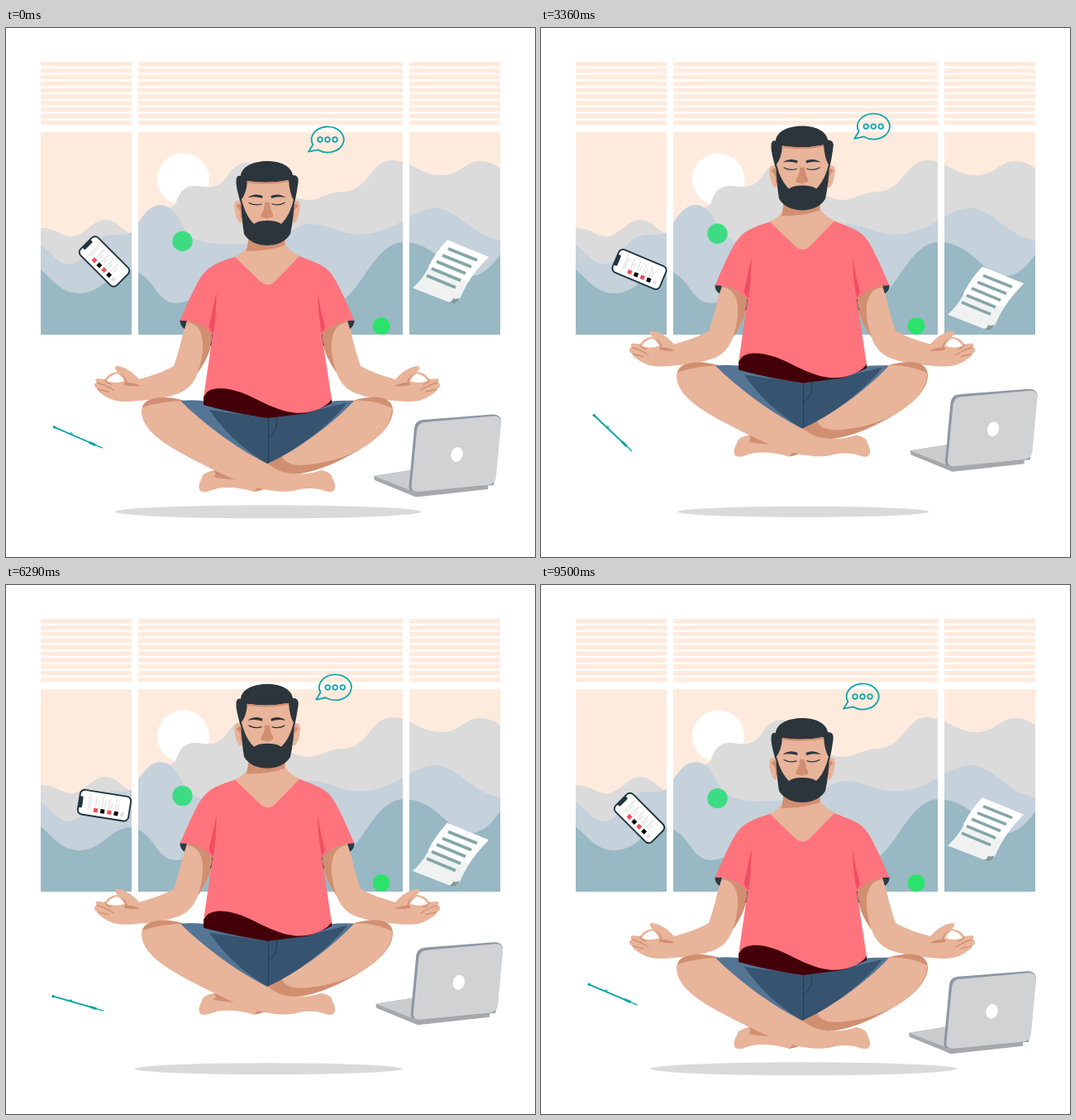
Write an HTML page that moves like this. It is 640 px wide and 640 px high and loops after 9570 ms.

```html
<!DOCTYPE html>
<html lang="en">
<head>
<meta charset="utf-8">
<title>Floating meditation</title>
<style>
  html, body { margin: 0; width: 100%; height: 100%; overflow: hidden; background: #fff; }
  svg { display: block; width: 100vw; height: 100vh; }
  .skin { fill: #e8b49a; }
  .shade { fill: #d18f71; }
  .hair { fill: #2c353c; }
  .line { fill: none; stroke-linecap: round; }
</style>
</head>
<body>
<svg viewBox="0 0 640 640">
  <defs>
    <clipPath id="panes"><path d="M42 126H152V371H42ZM160 126H480V371H160ZM488 126H598V371H488Z"/></clipPath>

    <g id="arm">
      <path class="skin" fill-rule="evenodd" d="M217 354C214 374 208 394 203 409C190 416 176 421 161 425
        C157 420 152 416 148 414Q140 409 133 409Q130 412 135 416Q124 417 120 425L110 424Q107 426 110 429
        Q106 430 107 433Q107 435 111 437Q111 440 115 442Q122 448 133 451Q145 453 160 451Q190 449 209 442
        Q226 435 232 417C243 402 250 385 250 366L235 350Z
        M122 427Q126 420 135 418Q140 421 143 427Q133 431 122 427Z"/>
      <path class="shade" d="M218 356C240 357 243 385 232 417C243 402 250 385 251 365L236 350Z
        M139 418Q145 422 147 429Q155 429 162 433Q151 434 144 432Q141 431 145 428Q143 422 139 418Z"/>
      <path class="line" stroke="#d18f71" stroke-width="1.3" d="M110 429Q121 432 130 438M111 437L124 440M120 425Q120 429 127 431"/>
      <path fill="#2c3a44" d="M210.500 353Q210 360 216 364L219 354ZM246 366L252 369V383L247 384Q250 375 249 369Z"/>
    </g>

    <g id="ear">
      <path class="skin" d="M286 210Q277 206 276 214Q277 229 282 235Q285 237 288 233Z"/>
      <path class="shade" d="M285 213Q279 211 279 217Q284 217 284 231Q289 225 285 213Z"/>
    </g>
  </defs>

  <g id="blinds" fill="#ffebdd"></g>
  <g clip-path="url(#panes)">
    <path fill="#ffebdd" d="M42 126H598V371H42Z"/>
    <circle cx="214.500" cy="183" r="31.500" fill="#fff"/>
    <path fill="#dbdbdb" d="M42 242C60 241 68 254 82 252C98 248 104 233 120 232C134 232 141 246 152 249L205 213
      C209 199 217 189 232 191C252 195 261 190 269 177C276 167 284 163 291 163C318 166 325 205 365 208
      C382 208 385 199 408 198C440 196 441 160 467 160C490 160 500 178 527 178C550 178 555 161 573 161
      C584 161 592 165 598 170V371H42Z"/>
    <path fill="#c5d1db" d="M42 263C55 270 62 287 77 286C98 284 101 254 122 251C134 248 141 253 152 247
      C162 234 171 214 187 214C210 215 210 247 230 256C262 268 320 260 345 246C366 230 385 240 405 246
      C435 256 465 243 482 232C500 222 508 218 519 218C548 219 562 251 598 257V371H42Z"/>
    <path fill="#98b8c4" d="M42 292C55 303 67 321 88 321C118 321 124 294 152 293C180 299 181 333 206 333
      C235 331 245 308 275 308C320 308 360 345 392 338C430 328 443 259 482 259C522 260 535 300 563 300
      C580 299 590 284 598 274V371H42Z"/>
    <circle cx="454" cy="360.500" r="10.500" fill="#2be36a"/>
  </g>

  <circle id="badge" cx="213.500" r="12.200" fill="#3ddc84"/>

  <g id="bubble" class="line" stroke="#11a5a9" stroke-width="1.800" stroke-linejoin="round">
    <path d="M371.300 141.200L366 149.700L377.500 147.400A19.500 15.500 0 1 0 371.300 141.200Z"/>
    <circle cx="380" cy="135" r="2.800"/><circle cx="389" cy="135" r="2.800"/><circle cx="398" cy="135" r="2.800"/>
  </g>

  <g id="phone">
    <rect x="-31" y="-15" width="62" height="30" rx="5.500" fill="#fff" stroke="#20343f" stroke-width="1.900"/>
    <path fill="#20343f" d="M-31 -7H-28Q-26.500 -7 -26.500 -5V5Q-26.500 7 -28 7H-31Z"/>
    <path class="line" stroke="#dedede" stroke-width="1.300" stroke-dasharray="2 1.500" d="M-19 -11V9M-16.500 -7V6M-10 -9V3M-2 -10V3M6 -8V3M14 -9V3M-7 -4V3M1 -4V3M9 -4V3M17 -4V3"/>
    <path fill="#f34e5c" d="M-12 5h5v5h-5zM4.600 5h5v5h-5z"/>
    <path d="M-3.700 5h5v5h-5zM12.900 5h5v5h-5z"/>
    <path fill="#e0e0e0" d="M21 5h4v5h-4z"/>
  </g>

  <g id="paper">
    <path fill="#f0f2f2" d="M534 256.500L584 277Q567 294 559 308Q552 320 549 328L537 332L492 314.500Q505 303 512 288Q520 271 534 256.500Z"/>
    <path fill="#fff" d="M534 256.500L584 277Q569 292 560 306L511 289Q520 271 534 256.500Z"/>
    <path fill="#829b99" d="M536 332Q540 331 541 327Q545 329 549 326Q547 330 543 333Z"/>
    <path stroke="#84a7a6" stroke-width="3.600" d="M535 267L570 281M528 275L563 289M521 282.500L556 297M515 291L550 305.500M509 299.500L544 314"/>
  </g>

  <g id="pen" stroke="#0aa5a5" fill="none">
    <path stroke-width="1.900" d="M-31 0H17"/>
    <path stroke-width="3" d="M-32 0H-29M16 0H24"/>
    <path stroke-width="1.300" d="M23 0H33M-10 -1.500H-7"/>
  </g>

  <g id="laptop">
    <path fill="#a7a8ac" d="M445 542L489 535L492 559L583 552V558L496 567.500L446 547Z"/>
    <path fill="#cbccce" d="M445 542L489 535L490 561L496 562Z"/>
    <path fill="#8d97a4" d="M487.500 554L494 484Q495 475 504 474L588 467.500Q598 467 599 475L590 553L494 561Q487 561 487.500 554Z"/>
    <path fill="#d1d2d4" d="M490.500 554L497 487Q498 478 506 477L590 469.500Q599 469 599 477L593 543Q592 552 583 553L498 561Q490 561 490.500 554Z"/>
    <ellipse cx="545.500" cy="516" rx="7" ry="9" transform="rotate(15 545.500 516)" fill="#fff"/>
  </g>

  <ellipse id="shadow" rx="185.500" ry="8" fill="#dadada"/>

  <g id="man">
    <use href="#arm"/><use href="#arm" transform="matrix(-1 0 0 1 632 0)"/>

    <path class="skin" d="M252 535Q237 538 237 545Q231 554 235 560Q240 563 249 559C264 554 282 556 300 561L318 554L300 535Z"/>
    <path class="shade" d="M251 535L320 554Q310 560 299 561Q308 556 300 551C288 545 268 547 251 543Q256 540 251 535Z"/>
    <path class="shade" d="M422 450C448 443 468 446 468 463C467 490 427 512 400 525C380 534 360 540 343 540L312 528Z"/>
    <path class="skin" d="M412 451C440 449 455 455 467 460C468 491 420 526 356 529Q336 528 334 517L340 505L385 465Z"/>
    <path class="skin" d="M212 450C188 443 164 446 164 464C165 492 206 512 250 534C275 546 300 558 325 560
      C340 562 349 560 356 558C368 556 378 557 386 560Q394 563 397 559Q400 554 395 545Q395 538 382 535
      Q362 541 345 539Q330 535 316 527L260 465Z"/>
    <path class="shade" d="M165 459C170 446 190 444 216 451Q190 451 165 459ZM316 526Q332 530 343 539Q328 537 316 526Z"/>

    <path fill="#547594" d="M211 451Q230 449 245 452H390Q405 450 421 451C392 482 350 512 316 527C285 512 242 482 211 451Z"/>
    <path fill="#36536f" d="M246 462L317 472L365 465L413 453C390 482 350 512 316 527C285 508 263 487 246 462Z"/>
    <path class="line" stroke="#1f3c59" d="M317.500 471V526M328 470Q329 489 318 495"/>

    <path class="skin" d="M293 250H338V262Q344 271 356 276L350 320H285L276 277Q290 271 293 262Z"/>
    <path class="shade" d="M294 252H338L337 263Q318 270 291 270Z"/>
    <path fill="#430008" d="M239 446L250 430H380L394 449V454Q375 463 364 466L317 472Q275 466 239 456Z"/>
    <path fill="#ff737d" d="M277 277C258 283 246 287 236 301C227 315 218 337 210.500 354C228 353 241 360 250 371L239 447
      C243 434 262 433 285 441C310 451 336 470 365 465Q387 460 394 449L382 371C391 360 404 353 421.500 354
      C414 337 405 315 396 301C388 287 374 284 355 276L327 305Q317 316 306 305Z"/>
    <path fill="#f04e61" d="M254.500 320Q249 345 245.500 362L251 370Q255 345 254.500 320ZM377.500 320Q377 345 382 369L386 362Q380 340 377.500 320Z"/>

    <use href="#ear"/><use href="#ear" transform="matrix(-1 0 0 1 632 0)"/>
    <path class="hair" d="M284 179C285 167 300 161 316 161C332 161 345 167 347 178Q355 178 353.500 187Q352 199 349 212H284
      C281 202 278 191 278.500 184Q279 178 284 179Z"/>
    <path class="skin" d="M292 185Q316 189 342 184Q343 200 348 208L342 242H290L284.500 208Q291 200 292 185Z"/>
    <path class="shade" d="M291.500 185Q316 189 342 184V186Q316 191 291.500 187Z"/>
    <path class="hair" d="M284 204C288 220 292 229 300 237Q305 233 316 233Q328 233 333 237C341 229 345 220 349 204
      Q348 232 344 249C339 258 328 263 316 263C304 263 293 258 288 249Q285 232 284 204Z"/>
    <path class="shade" d="M313 211H319Q320 221 323 225Q324 230 319 229.500L316 231L312 229.500Q307 230 309 225Q313 220 313 211Z"/>
    <path class="hair" d="M292.500 205Q301 199 310.500 203L310 206Q302 203 292.500 205ZM338.500 205Q330 199 320.500 203L321 206Q329 203 338.500 205Z"/>
    <path class="line" stroke="#2c353c" stroke-width="1.300" d="M294 211.500Q301 215.500 309 213M322 213Q330 215.500 337 211.500"/>
  </g>
</svg>

<script>
const LOOP = 9570, HALF = LOOP / 2;
const KEY_TIMES = [0, 1290, 2570, 4210, 6290, 8430];
const $ = id => document.getElementById(id);
const place = (id, x, y, extra = '') => $(id).setAttribute('transform', `translate(${x} ${y}) ${extra}`);

for (let i = 0; i < 10; i++) {
  const y = 41 + i * 7.85, bottom = y + 5.6;
  $('blinds').innerHTML += `<path d="M42 ${y}H152V${bottom}H42ZM160 ${y}H480V${bottom}H160ZM488 ${y}H598V${bottom}H488Z"/>`;
}

const smooth = p => p * p * (3 - 2 * p);

// cubic-bezier(1/6, 1/6, 2/3, 1)
function glide(p) {
  let low = 0, high = 1;
  for (let i = 0; i < 20; i++) {
    const s = (low + high) / 2, r = 1 - s;
    if (0.5 * s * r * r + 2 * s * s * r + s ** 3 < p) low = s; else high = s;
  }
  return 0.5 * low * (1 - low) ** 2 + 3 * low * low * (1 - low) + low ** 3;
}

const thereAndBack = (t, ease) => t < HALF ? ease(t / HALF) : 1 - ease(t / HALF - 1);

// Looping smooth curve through one value per key time
function track(t, values) {
  const n = KEY_TIMES.length;
  const value = k => values[(k + n) % n];
  const time = k => KEY_TIMES[(k + n) % n] + LOOP * Math.floor(k / n);
  const slope = k => (value(k + 1) - value(k - 1)) / (time(k + 1) - time(k - 1));
  let i = n - 1;
  while (KEY_TIMES[i] > t) i--;
  const span = time(i + 1) - time(i), p = (t - time(i)) / span, q = 1 - p;
  return value(i) * (1 - smooth(p)) + value(i + 1) * smooth(p)
    + span * p * q * (q * slope(i) - p * slope(i + 1));
}

function draw(t) {
  const drift = thereAndBack(t, glide);
  place('man', 0, -54 * thereAndBack(t, smooth));
  place('shadow', 317.5, 585.3, `scale(${1 - 0.213 * drift})`);
  place('bubble', 15.6 * drift, -18.8 * drift);
  place('paper', 0, 46 * thereAndBack(t, p => p));
  place('laptop', track(t, [0, 0, 0, 3, 2.2, 0]), track(t, [0, -12.3, -24.3, -35.5, -35.3, -14.8]));
  place('phone', 119, track(t, [282.5, 298, 302, 279.7, 266.7, 280]),
    `rotate(${track(t, [45, 36, 31, 14.5, 9, 38])})`);
  place('pen', 86.3, track(t, [495, 491.5, 488, 493, 506, 497.5]),
    `rotate(${track(t, [23.4, 34.4, 45, 38, 16, 22.3])})`);
  $('badge').setAttribute('cy', track(t, [258, 250, 247, 251.5, 255, 257]));
}

function tick() {
  draw(performance.now() % LOOP);
  requestAnimationFrame(tick);
}
tick();
</script>
</body>
</html>
```
